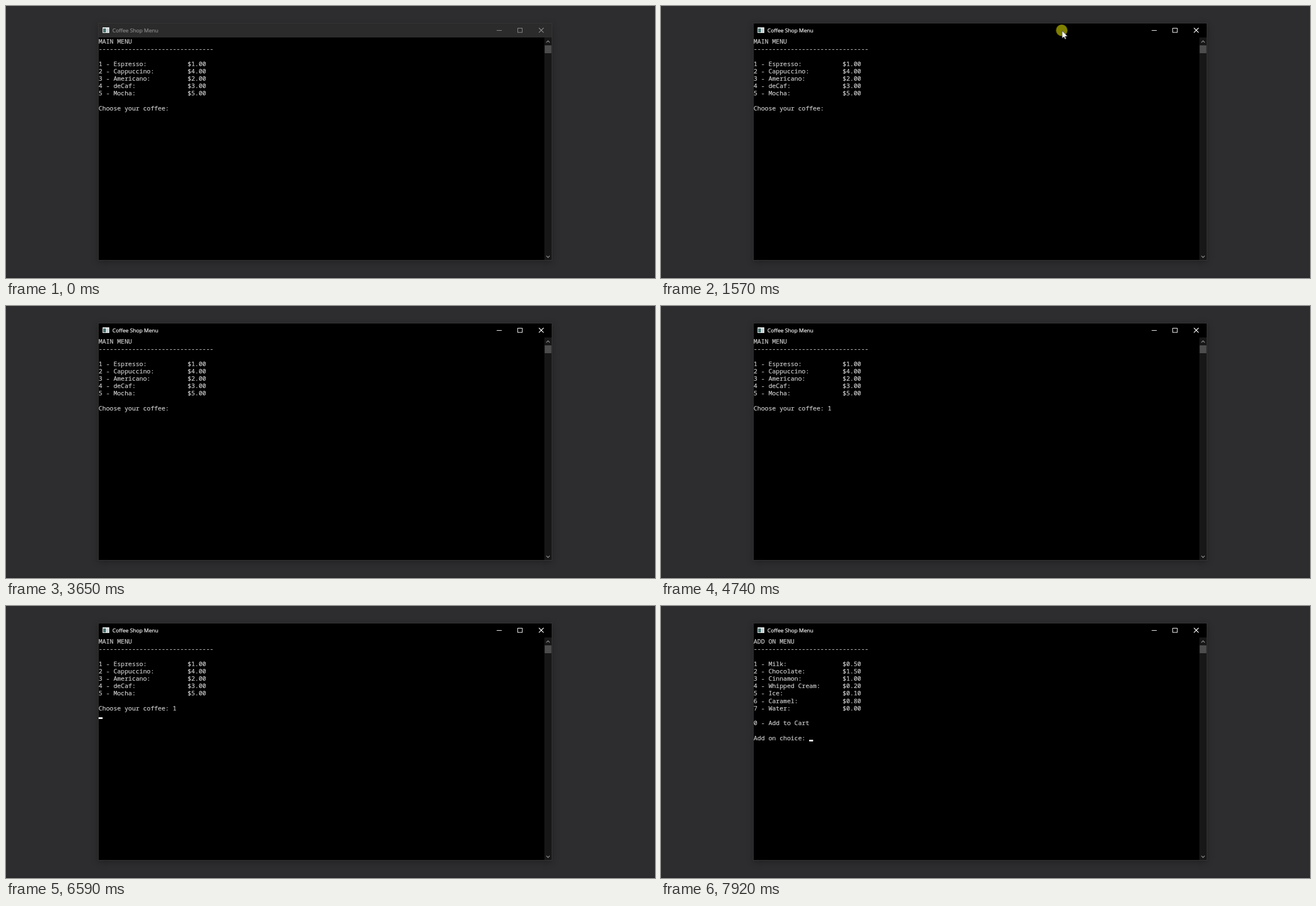
Recreate the animation shown at these times as an HTML page. Size 1156 by 484 pixels, loop 8000 ms.

```html
<!DOCTYPE html>
<html lang="en">
<head>
<meta charset="utf-8">
<title>Coffee Shop Menu</title>
<style>
  html, body { margin: 0; width: 100%; height: 100%; overflow: hidden; background: #2d2d2f; }
  .stage { position: relative; width: 1156px; height: 484px; overflow: hidden; background: #2d2d2f; }
  .stage::after { content: ""; position: absolute; left: 0; right: 0; bottom: 0; height: 2px; background: #29292b; }
  .window {
    position: absolute; left: 165px; top: 31px; width: 807px; height: 421px; background: #000;
    box-shadow: 0 0 0 1px #363638, 0 3px 11px 1px rgba(0, 0, 0, .28);
  }
  .bar { position: absolute; left: 0; top: 0; width: 807px; height: 25px; }
  .bar svg { position: absolute; left: 0; top: 0; }
  .bar span {
    position: absolute; left: 24.5px; top: 5px; white-space: pre;
    font: 9.5px/15px "Open Sans", "Noto Sans", sans-serif;
    -webkit-text-stroke: .2px currentColor;
  }
  .terminal { position: absolute; left: 0; top: 25px; width: 794px; height: 396px; }
  pre {
    position: absolute; left: 0; top: 0; margin: 0; color: #ccc;
    font: 11px/13.2px "Noto Sans Mono", "DejaVu Sans Mono", monospace;
    -webkit-text-stroke: .2px currentColor;
  }
  .caret { position: absolute; left: 0; top: 129px; width: 7px; height: 3px; }
  .caret i { display: block; height: 100%; background: #fff; }
  .scroll { position: absolute; left: 794px; top: 25px; }
  .pointer { position: absolute; left: 0; top: 0; overflow: visible; }

  /* Every change is a hard cut on one shared 8 s clock. */
  .bar, .menu, .addons, .typed, .caret, .caret i, .pointer, .click { animation: 8s step-end infinite; }
  .bar { animation-name: focus; }
  .menu { animation-name: menu; }
  .addons { animation-name: addons; }
  .typed { animation-name: typed; }
  .caret { animation-name: place; }
  .caret i { animation-name: blink; }
  .pointer { animation-name: move; }
  .click { animation-name: click; }

  @keyframes focus {
    0% { background: #2b2b2b; color: #8c8c8c; }
    19.625%, 100% { background: #000; color: #fff; }
  }
  @keyframes menu { 0% { opacity: 1; } 83.25%, 100% { opacity: 0; } }
  @keyframes addons { 0% { opacity: 0; } 83.25%, 100% { opacity: 1; } }
  @keyframes typed { 0% { opacity: 0; } 57.125%, 100% { opacity: 1; } }
  @keyframes place {
    0% { transform: translate(132px, 0); }
    57.125% { transform: translate(139px, 0); }
    82.375% { transform: translate(0, 13px); }
    83.25%, 100% { transform: translate(99px, 53px); }
  }
  @keyframes blink {
    0%, 32.875%, 45.625%, 59.25%, 71.625%, 92% { opacity: 0; }
    26.25%, 39.5%, 52.375%, 66%, 78.625%, 99%, 100% { opacity: 1; }
  }
  @keyframes move {
    0% { transform: translate(730px, -4px); opacity: 0; }
    12.625% { transform: translate(730px, -4px); opacity: 1; }
    13.5% { transform: translate(724px, 17px); opacity: 1; }
    14.375% { transform: translate(717px, 36px); opacity: 1; }
    15.375% { transform: translate(714.5px, 44px); opacity: 1; }
    20.375% { transform: translate(715px, 36px); opacity: 1; }
    21.375% { transform: translate(721px, 13px); opacity: 1; }
    22.375%, 100% { transform: translate(721px, 13px); opacity: 0; }
  }
  @keyframes click {
    0%, 20.375%, 100% { opacity: 0; }
    19.625% { opacity: 1; }
  }
</style>
</head>
<body>
<div class="stage">
  <div class="window">
    <div class="bar">
      <svg width="807" height="25">
        <rect x="7" y="7" width="12" height="10" fill="#e9eded"/>
        <rect x="8" y="9" width="5" height="7" fill="#47706f"/>
        <rect x="14" y="9" width="4" height="7" fill="#c4d0d2"/>
        <g fill="none" stroke="currentColor">
          <path d="M709 12.5h9"/>
          <rect x="746.5" y="8.5" width="8" height="7.5"/>
          <path d="M784.2 8l8.4 8.4m0-8.4l-8.4 8.4" stroke-width="1.2"/>
        </g>
      </svg>
      <span>Coffee Shop Menu</span>
    </div>
    <div class="terminal">
<pre class="menu">MAIN MENU
-------------------------------

1 - Espresso:           $1.00
2 - Cappuccino:         $4.00
3 - Americano:          $2.00
4 - deCaf:              $3.00
5 - Mocha:              $5.00

Choose your coffee: <span class="typed">1</span></pre>
<pre class="addons">ADD ON MENU
-------------------------------

1 - Milk:               $0.50
2 - Chocolate:          $1.50
3 - Cinnamon:           $1.00
4 - Whipped Cream:      $0.20
5 - Ice:                $0.10
6 - Caramel:            $0.80
7 - Water:              $0.00

0 - Add to Cart

Add on choice: </pre>
      <div class="caret"><i></i></div>
    </div>
    <svg class="scroll" width="13" height="396">
      <rect width="13" height="396" fill="#171717"/>
      <rect x=".5" y="14" width="12" height="14" fill="#4d4d4d"/>
      <path d="M3.5 9l3-3 3 3M3.5 388.5l3 3 3-3" fill="none" stroke="#868686" stroke-width="1.3"/>
    </svg>
  </div>
  <svg class="pointer" width="10" height="16">
    <circle class="click" cx="-.7" cy="-.8" r="10.2" fill="#7f7f00"/>
    <path d="M0 0V13.6L3.1 10.8 5.2 15.2 7.2 14.3 5.2 10H9.6Z" fill="#fff" stroke="#000" stroke-width=".5"/>
  </svg>
</div>
</body>
</html>
```
